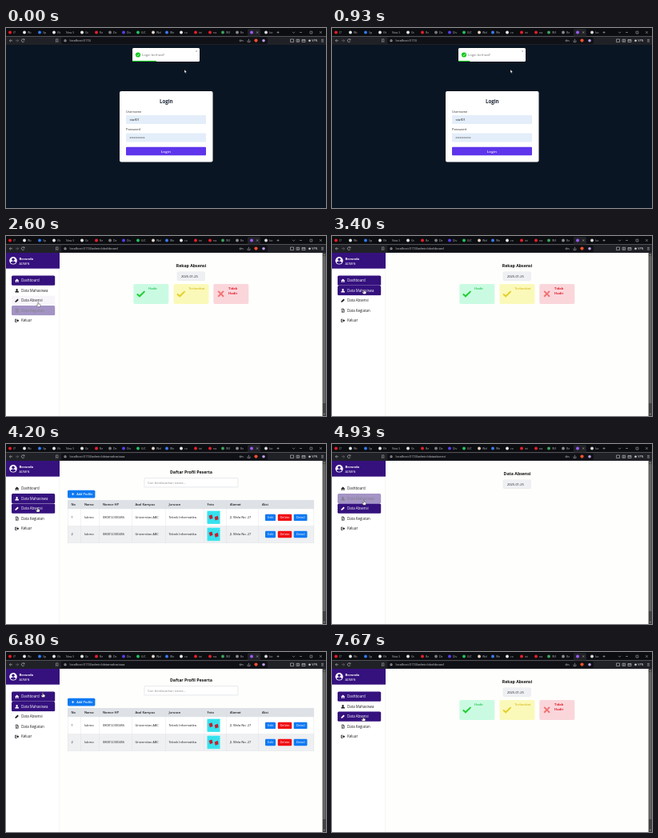
Animation, 400 px wide and 225 px high, one loop 8000 ms. Source, as an HTML page:

```html
<!DOCTYPE html>
<html lang="id">
<head>
<meta charset="utf-8">
<title>Rekap Absensi</title>
<style>
html, body { margin: 0; width: 100%; height: 100%; overflow: hidden; background: #fff; }
svg { display: block; width: 100vw; height: 100vh; font-family: "Open Sans", "Noto Sans", sans-serif; }
text { white-space: pre; }
</style>
</head>
<body>
<svg id="stage" viewBox="0 0 400 225"></svg>
<script>
const LOOP = 8000;
const INDIGO = [53, 17, 126], INK = [28, 28, 32], WHITE = [255, 255, 255], BLUE = '#0f79f2';

const rect = (x, y, w, h, fill, r = 0, more = '') =>
  `<rect x="${x}" y="${y}" width="${w}" height="${h}" rx="${r}" fill="${fill}" ${more}/>`;
const dot = (x, y, r, fill) => `<circle cx="${x}" cy="${y}" r="${r}" fill="${fill}"/>`;
const line = (d, stroke, w = 0.6) =>
  `<path d="${d}" fill="none" stroke="${stroke}" stroke-width="${w}"/>`;
// y is the vertical middle of the capitals
const text = (x, y, s, size, fill, more = '') =>
  `<text x="${x}" y="${y + size * 0.36}" font-size="${size}" fill="${fill}" ${more}>${s}</text>`;
const MID = ' text-anchor="middle" ', BOLD = ' font-weight="700" ', SEMI = ' font-weight="600" ';
const group = (id, body) => `<g id="${id}">${body}</g>`;

function browser() {
  const tabs = [
    [5, '#f01c24', '(7'], [23, '#e8eee8', 'Wc'], [42, '#2f7df0', 'Sp'], [60, '#eee', '(St'],
    [95, '#eee', 'Gt'], [113, '#e8202c', 'Re'], [130, '#7a7a80', 'De'], [147, '#5a3ff0', 'Div'],
    [165, '#22c55e', '(UC'], [184, '#e8d8c8', 'Wel'], [201, '#3b7cf5', 'We'], [219, '#eee', 'co'],
    [237, '#e8202c', 'ini'], [255, '#e8202c', 'na'], [271, '#3fa45c', 'W3'], [289, '#8a8a90', 'Re'],
    [325, '#ddd', 'loc']
  ];
  const grey = '#c4c4c8';
  return rect(0, 0, 400, 10.5, '#0c0d11') + rect(0, 10.5, 400, 10.5, '#202126') +
    rect(69, 11.5, 258, 8.5, '#101116', 2) + rect(302, 1, 16, 9.5, '#202126', 1.5) +
    tabs.map(([x, c, s]) => dot(x, 5.5, 1.9, c) + text(x + 4, 5.3, s, 3.5, '#b4b4b8')).join('') +
    text(75, 5.3, 'New S', 3.5, '#b4b4b8') + dot(307, 5.5, 2, '#9a5cf5') +
    line('M313 4.3l2.4 2.4M315.4 4.3l-2.4 2.4M340 4v3M338.5 5.5h3', grey, 0.5) +
    line('M358 4.8l1.6 1.6 1.6-1.6M367 5.5h3M380 4.2h2.8v2.8h-2.8zM392 4.1l2.8 2.8M394.8 4.1l-2.8 2.8', grey, 0.5) +
    line('M8 15.8H4.4M6 14.2L4.4 15.8l1.6 1.6', grey) +
    line('M12 15.8h3.6M14 14.2l1.6 1.6-1.6 1.6', '#77777c') +
    line('M22.8 14.6a1.9 1.9 0 1 0 .2 1.9M23 13.5v1.5h-1.5', grey) +
    line('M62.5 13.9h2.4v3.7l-1.2-1-1.2 1z', grey, 0.5) +
    dot(74, 15.8, 1.5, grey) + dot(74, 15.8, 0.7, '#101116') +
    line('M292 15.8a1 1 0 1 0 2 0a1 1 0 1 0-2 0M294 15.8h2.4v1M302 15.4v2.2h3v-2.2M303.5 16.5v-2.8', grey, 0.5) +
    dot(312.5, 15.6, 2.1, '#f0512c') + dot(322, 15.8, 1.8, '#b9a4e8') +
    line('M355.5 14h4v3.6h-4zM363 14.3h3.6v3h-3.6zM364.8 14.3v3M370 14.5h4v3h-4zM370 15.5h4', grey, 0.6) +
    dot(379.5, 15.8, 1.4, grey) + text(382.3, 15.8, 'VPN', 3.4, grey, SEMI) +
    line('M394 14.4h3M394 15.8h3M394 17.2h3', grey, 0.5) +
    `<text id="url" x="79.5" y="17" font-size="3.9" fill="#d0d0d4"></text>`;
}

function login() {
  const field = (y, label) => text(150, y, label, 4, '#333') + rect(150, y + 4.5, 100, 11, '#e4eefa', 1);
  const dots = Array.from({ length: 11 }, (_, i) => dot(155.2 + i * 1.75, 137, 0.6, '#222')).join('');
  return rect(0, 21, 400, 204, '#0a1523') + rect(142, 79, 116.5, 88.5, '#fff', 2) +
    text(200.3, 91.8, 'Login', 6.2, '#1f2937', MID + BOLD) +
    field(104.5, 'Username') + text(154.5, 114.5, 'staf01', 4.3, '#222') +
    field(127, 'Password') + dots +
    rect(150, 148.7, 100, 10.5, '#5f35ec', 1) +
    text(200, 154, 'Login', 4.2, '#fff', MID + SEMI + 'letter-spacing=".35"') +
    rect(158, 25, 84, 17, '#fff', 1.5) + dot(165, 33.5, 3.1, '#12c71c') +
    line('M163.4 33.6l1.2 1.2 2.1-2.5', '#fff', 0.7) +
    text(170, 33.5, 'Login berhasil!', 4.2, '#777') +
    line('M237 28l2 2M239 28l-2 2', '#888', 0.4) +
    rect(158, 40.9, 0, 1.1, '#12c71c', 0, 'id="bar"');
}

const menu = [
  ['Dashboard', 'M-2.6 .2L0-2.2 2.6 .2H1.8V2.2H.6V.6H-.6V2.2H-1.8V.2z'],
  ['Data Mahasiswa', 'M-1.3-1.1a1.2 1.2 0 1 1 2.4 0a1.2 1.2 0 1 1-2.4 0M-2.4 2.3c0-3 4.8-3 4.8 0z'],
  ['Data Absensi', 'M-2.3 2.3L-1.9 .6 .8-2.1 2.1-.8-.6 1.9z'],
  ['Data Kegiatan', 'M-1.8-2.4H.6L1.8-1.2V2.4H-1.8zM-1.2-1.8V1.8H1.2V-.8H.2V-1.8zM-.8 0H.8V.5H-.8zM-.8 .9H.8V1.4H-.8z'],
  ['Keluar', 'M-2.4-2H-.2V-1.3H-1.6V1.3H-.2V2H-2.4zM-1-.5H.6V-1.8L2.6 0 .6 1.8V.5H-1z']
];

const scrollbar = () => rect(395.6, 21, 4.4, 204, '#424242') + rect(396.2, 25, 3.2, 184, '#686868') +
  '<path d="M396.8 24l1-1.4 1 1.4zM396.8 222l1 1.4 1-1.4z" fill="#aaa"/>';

function sidebar() {
  const items = menu.map(([label, d], i) => {
    const y = 55.7 + i * 12.5;
    return '<g class="item">' + rect(7, y - 6.1, 54.2, 12.2, '#000', 1.6) +
      `<path transform="translate(13.7 ${y})" d="${d}" fill-rule="evenodd"/>` +
      text(19, y, label, 4.4, '#222') + '</g>';
  }).join('');
  return rect(0, 21, 400, 204, '#fefefc') + rect(0, 41, 67, 184, '#fff') +
    rect(66.7, 41, 0.4, 184, '#e9e9ec') + rect(0, 21, 67, 19.7, '#35117e') +
    dot(9, 30.8, 4.8, '#fff') + dot(9, 29.3, 1.7, '#35117e') +
    '<path d="M5.8 33.4c.6-2.6 5.8-2.6 6.4 0a4.3 4.3 0 0 1-6.4 0z" fill="#35117e"/>' +
    text(16.5, 28.8, 'Beranda', 4.2, '#fff', BOLD) + text(16.5, 34.4, 'ADMIN', 3.9, '#fff') +
    items + scrollbar();
}

const heading = (y, s) => text(231.5, y, s, 5.2, '#111', MID + BOLD);
const dateBox = () => rect(214, 44.7, 34.5, 11, '#eef0f3', 1.5, 'stroke="#e0e2e6" stroke-width=".4"') +
  text(219, 50.3, '2025-01-25', 4, '#1c1c20');

function dashboard() {
  const card = (x, bg, fg, ink, words, mark, weight = SEMI) => rect(x, 60, 44, 25, bg, 2) +
    words.map((w, i) => text(x + 18.8, 65.5 + i * 6.2, w, 4.1, fg, weight)).join('') +
    `<path transform="translate(${x + 9.3} 72.3)" d="${mark}" fill="none" stroke="${ink}" stroke-width="2"/>`;
  const check = 'M-4.8 .2L-1.6 3 4.8-3.2', cross = 'M-3.4-3.4L3.4 3.4M3.4-3.4L-3.4 3.4';
  return heading(37.5, 'Rekap Absensi') + dateBox() +
    card(159.3, '#cafbe2', '#22c04f', '#22cc33', ['Hadir'], check) +
    card(209.5, '#fbf9b9', '#d8bd22', '#e2d02c', ['Terlambat'], check) +
    card(259.3, '#fad6db', '#e01c28', '#f07474', ['Tidak', 'Hadir'], cross, BOLD);
}

function students() {
  const cols = [[77, 'No'], [93.5, 'Nama'], [116.5, 'Nomor HP'], [157, 'Asal Kampus'],
    [199, 'Jurusan'], [247, 'Foto'], [275.5, 'Alamat'], [315.5, 'Aksi']];
  const values = ['lukmo', '080012300456', 'Universitas ABC', 'Teknik Informatika', '', 'Jl. Wela No. 27'];
  const button = (x, y, w, label, fill) => rect(x, y - 4.2, w, 8.4, fill, 1.2) +
    text(x + w / 2, y, label, 4, '#fff', MID);
  const row = n => {
    const y = 70.8 + n * 21.1;
    return rect(77, y - 10.4, 308, 21.1, n % 2 ? '#fff' : '#eff0f2') +
      [n, ...values].map((v, i) => text(cols[i][0] + 4.4, y, v, 4, '#1c1c20')).join('') +
      rect(251.3, y - 8.4, 16.4, 16.6, '#35e2ee', 0.8, 'stroke="#e4fbfc" stroke-width=".7" stroke-dasharray="1.2 1.2"') +
      `<path d="M253.6 ${y - 2.2}l3.8-1.4 1.2 4.4-3.6 1.5zM260.8 ${y - 0.6}l4-1.6.8 4.5-4 1.4z" fill="#c5202f"/>` +
      button(324, y, 13, 'Edit', BLUE) + button(339.8, y, 17.4, 'Delete', '#ef0d12') +
      button(359.7, y, 16.8, 'Detail', BLUE);
  };
  return heading(35.5, 'Daftar Profil Peserta') +
    rect(173, 42.6, 117, 11.3, '#fff', 0.8, 'stroke="#cfd2d6" stroke-width=".5"') +
    text(177, 48.2, 'Cari berdasarkan nama...', 4.1, '#8a8d93') +
    rect(77, 57.7, 34.4, 9.8, BLUE, 1.5) + line('M82 62.6h3.2M83.6 61v3.2', '#fff', 0.7) +
    text(88.2, 62.6, 'Add Profile', 3.8, '#fff', SEMI) +
    rect(77, 70, 308, 11.4, '#dee2e6') +
    cols.map(([x, s]) => text(x + 4.4, 75.7, s, 4, '#1c1c20', SEMI)).join('') + row(1) + row(2) +
    [...cols.map(c => c[0]), 384.7].map(x => rect(x, 70, 0.4, 54, '#dcdfe3')).join('') +
    rect(77, 102.4, 308, 0.4, '#dcdfe3') + rect(77, 123.5, 308, 0.4, '#dcdfe3');
}

const attendance = () => heading(37.5, 'Data Absensi') + dateBox();

const cursor = (id, d) => group(id, `<path d="${d}" fill="#fff" stroke="#111" stroke-width=".35"/>`);

const stage = document.getElementById('stage');
stage.innerHTML = group('login', login()) + group('side', sidebar()) + group('dash', dashboard()) +
  group('students', students()) + group('attendance', attendance()) + browser() +
  cursor('arrow', 'M0 0V4.2L1 3.3 1.7 4.8 2.4 4.5 1.7 3.1H3z') +
  cursor('hand', 'M-.5 0Q0-.5.5 0V2L2.4 2.4Q2.9 2.6 2.8 3.4L2.3 5.6H-.9L-2.2 3.5Q-2 2.7-.5 3.6z');

const $ = id => document.getElementById(id);
const items = [...document.querySelectorAll('.item')];

// [start, view, address]
const views = [
  [0, 'login', ''], [1800, 'login', '/admin/dashboard'], [1870, 'dash', '/admin/dashboard'],
  [3870, 'students', '/admin/datamahasiswa'], [4570, 'attendance', '/admin/dataabsensi'],
  [5600, 'students', '/admin/datamahasiswa'], [6900, 'dash', '/admin/dashboard']
];
// highlight strength per menu item: [time, value]
const glow = [
  [[0, 1], [3830, 1], [4080, 0], [6400, 0], [6560, 1]],
  [[2990, 0], [3170, 1], [4530, 1], [4750, 0], [4850, 0], [5030, 1], [6850, 1], [7100, 0],
    [7200, 0], [7320, 1], [7560, 1], [7660, 0]],
  [[2596, 0], [2720, 1], [2990, 1], [3170, 0], [4050, 0], [4190, 1], [5550, 1], [5800, 0],
    [7560, 0], [7660, 1]],
  [[2400, 0], [2510, 1], [2530, 1], [2660, 0]],
  [[0, 0]]
];
const pointer = [
  [0, 223, 52], [2330, 223, 52], [2430, 110, 86], [2520, 45, 93], [2600, 40.3, 83], [2730, 39, 80],
  [2930, 39, 80], [3130, 40, 67], [4000, 40, 67], [4190, 39.5, 79.5], [4780, 39.5, 79.5],
  [5000, 40, 66.5], [6270, 40, 66.5], [6560, 46, 51], [7100, 46, 51], [7300, 41, 66.5],
  [7530, 41, 66.5], [7660, 39, 81]
];

function at(track, t, k = 1) {
  const i = track.findIndex(p => p[0] > t);
  if (i === 0) return track[0][k];
  if (i < 0) return track[track.length - 1][k];
  const a = track[i - 1], b = track[i];
  return a[k] + (b[k] - a[k]) * (t - a[0]) / (b[0] - a[0]);
}
const mix = (a, b, k) => `rgb(${a.map((v, i) => Math.round(v + (b[i] - v) * k))})`;
const show = (id, on) => { $(id).style.display = on ? '' : 'none'; };

function draw(t) {
  const [, view, path] = views.filter(v => v[0] <= t).pop();
  for (const id of ['login', 'dash', 'students', 'attendance']) show(id, id === view);
  show('side', view !== 'login');
  $('url').textContent = 'localhost:5174' + path;
  $('bar').setAttribute('width', Math.max(0, 30 - t * 84 / 5000));

  items.forEach((el, i) => {
    const k = at(glow[i], t), ink = mix(INK, WHITE, k);
    const [box, icon, label] = el.children;
    box.setAttribute('fill', mix(WHITE, INDIGO, k));
    icon.setAttribute('fill', ink);
    label.setAttribute('fill', ink);
  });

  const x = at(pointer, t, 1), y = at(pointer, t, 2), over = x < 61.5;
  show('arrow', !over);
  show('hand', over);
  $(over ? 'hand' : 'arrow').setAttribute('transform', `translate(${x} ${y})`);
}

const start = performance.now();
function tick() {
  draw((performance.now() - start) % LOOP);
  requestAnimationFrame(tick);
}
tick();
</script>
</body>
</html>
```
